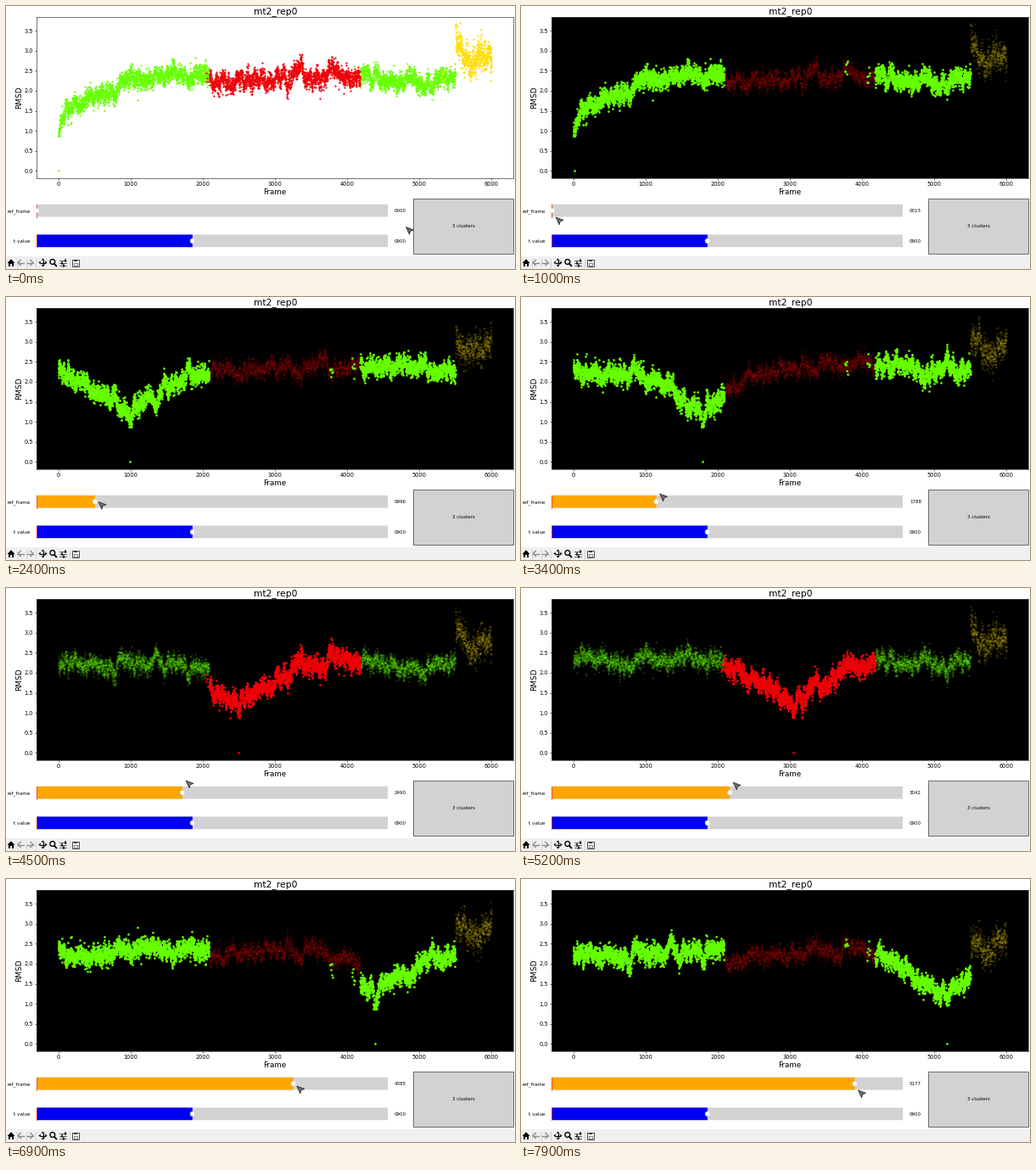
These frames come from a looping animation (600 by 310 pixels, 8 s). A matplotlib script:

```python
import numpy as np
import matplotlib.pyplot as plt
from matplotlib.animation import FuncAnimation
from matplotlib.patches import Circle, Polygon, Rectangle

W, H, DPI = 600, 310, 100
STEP, FRAMES = 100, 80
PT = 72 / DPI
N = 6000
CLICK = 800
X0, X1 = 36.2, 450

COLORS = ["#66ff00", "#ee0008", "#ffdd00"]
DIM_ALPHA = [0.25, 0.14, 0.18]
TRACK, EDGE = "#d2d2d2", "#3c3c3c"

plt.rcParams["font.family"] = "DejaVu Sans"

# --- simulated trajectory ---
rng = np.random.default_rng(4)
idx = np.arange(N)

# How far each stretch of the trajectory lies from the rest
SHIFT = [(0, 0.05), (780, -0.1), (830, 0.08), (2089, 0.06), (2090, -0.1),
         (3700, 0.12), (4300, 0.08), (5000, -0.04), (5499, 0),
         (5500, 0.85), (5700, 0.4), (6000, 0.65)]
shift = np.interp(idx, *zip(*SHIFT))


def wander(width):
    s = np.convolve(rng.normal(size=N), np.hanning(width), mode="same")
    return s / s.std()


def make_noise():
    return (0.105 * rng.normal(size=N) + 0.05 * wander(14)
            + 0.08 * wander(60) + 0.06 * wander(240))


def make_clusters():
    c = np.searchsorted([2090, 4180, 5500], idx, side="right")
    c = np.array([0, 1, 0, 2])[c]
    for centre, count, label in [(3780, 7, 0), (4090, 6, 0),
                                 (2055, 4, 1), (5330, 7, 2)]:
        c[rng.normal(centre, 12, count).astype(int)] = label
    return c


noise_a, noise_b = make_noise(), make_noise()
cluster = make_clusters()
spread = np.where(idx >= 5500, 1.6, 1.0)


def rmsd(ref):
    d = np.abs(idx - ref)
    far = 1 - np.exp(-(d / 680) ** 2)
    far = np.where(cluster == cluster[ref], far, 0.5 + 0.5 * far)
    level = 1.5 + far * (0.75 + shift + shift[ref])
    dip = 0.25 * np.exp(-d / 150) + 0.4 * np.exp(-d / 18)
    phase = ref / 450
    noise = spread * (noise_a * np.cos(phase) + noise_b * np.sin(phase))
    y = np.maximum(level - dip + noise, 0.87)
    y[ref] = 0
    return y


# --- layout in pixels, y pointing down ---
fig = plt.figure(figsize=(W / DPI, H / DPI), dpi=DPI, facecolor="white")


def pixel_axes(zorder):
    a = fig.add_axes([0, 0, 1, 1], zorder=zorder)
    a.set(xlim=(0, W), ylim=(H, 0))
    a.axis("off")
    return a


ui, top = pixel_axes(0), pixel_axes(5)


def rect(x0, y0, x1, y1, color, **kw):
    return ui.add_patch(Rectangle((x0, y0), x1 - x0, y1 - y0, fc=color, **kw))


def line(xs, ys, color="black", width=1.0):
    ui.plot(xs, ys, color=color, lw=width * PT)


def label(x, y, s, size, ha="center", va="baseline", **kw):
    return ui.text(x, y, s, fontsize=size * PT, ha=ha, va=va, **kw)


def poly(points):
    ui.add_patch(Polygon(points, fc="black"))


label(317.5, 9, "mt2_rep0", 10.7)
label(317, 222, "Frame", 8.8)
label(16, 107.5, "RMSD", 9, va="center", rotation=90)

# --- scatter plot ---
ax = fig.add_axes([X0 / W, 1 - 202.5 / H, 562 / W, 189.5 / H])
ax.set(xlim=(-300, 6305), ylim=(-0.18, 3.85),
       xticks=range(0, 6001, 1000), yticks=np.arange(0, 3.6, 0.5))
ax.tick_params(labelsize=6.6 * PT, length=2 * PT, width=0.6 * PT, pad=2 * PT)
for spine in ax.spines.values():
    spine.set(linewidth=0.7 * PT, edgecolor=EDGE)
dots = [ax.plot([], [], "o", color=c, mew=0)[0] for c in COLORS]


# --- sliders and button ---
class Bar:
    def __init__(self, y, name, color, vmax):
        self.y, self.vmax = y, vmax
        rect(X0, y, X1, y + 14.7, TRACK, snap=False)
        label(28.5, y + 9.2, name, 5.6, "right")
        self.fill = rect(X0, y, X0, y + 14.7, color, snap=False)
        line([X0, X0], [y, y + 14.7], "#e33b20", 0.8)
        self.knob = ui.add_patch(Circle((X0, y), 2.8, fc="white",
                                        ec=TRACK, lw=0.5 * PT, zorder=4))
        self.text = label(458, y + 9.2, "", 5.5, "left")

    def x(self, v):
        return X0 + (X1 - X0) * v / self.vmax

    def set(self, v):
        self.fill.set_width(self.x(v) - X0)
        self.knob.center = self.x(v), self.y + 7.4
        self.text.set_text(f"{v:04d}")


ref_bar = Bar(233.8, "ref_frame", "#ffa500", 5996)
t_bar = Bar(269.5, "t value", "#0000f2", 2028)
t_bar.set(900)

rect(480, 227, 598.4, 291.6, TRACK, ec=EDGE, lw=0.7 * PT)
label(539.5, 261.3, "3 clusters", 5.5)


# --- toolbar ---
def arrow(x, sign):
    grey = "#8c8c8c"
    line([x - 3.3, x + 3.3], [302.5, 302.5], grey, 1.4)
    line([x + sign * 0.2, x + sign * 3.3, x + sign * 0.2],
         [299.4, 302.5, 305.6], grey, 1.4)


def toolbar():
    rect(0, 295, W, H, "#f0f0f0")
    for x in (12.5, 23.5, 34.5, 74.5):
        line([x, x], [297.5, 307.5], "#c4c4c4", 0.7)

    poly([(1.5, 303), (6, 298.3), (10.5, 303)])
    poly([(3, 302), (9, 302), (9, 306.8), (6.9, 306.8), (6.9, 304.2),
          (5.1, 304.2), (5.1, 306.8), (3, 306.8)])
    arrow(17.5, -1)
    arrow(28.7, 1)

    cx, cy = 43.5, 302.5
    for dx, dy in [(1, 0), (-1, 0), (0, 1), (0, -1)]:
        bx, by = cx + 2.8 * dx, cy + 2.8 * dy
        line([cx, bx], [cy, by], width=1.2)
        poly([(cx + 5 * dx, cy + 5 * dy),
              (bx + 2 * dy, by + 2 * dx), (bx - 2 * dy, by - 2 * dx)])

    ui.add_patch(Circle((54.8, 301.5), 2.9, fc="none", ec="black",
                        lw=1.4 * PT))
    line([57, 59.3], [303.8, 306.4], width=1.8)

    for y, knob in [(299.5, 69.5), (302.5, 65.5), (305.5, 68.3)]:
        line([63.2, 71.3], [y, y], EDGE, 0.8)
        line([knob, knob], [y - 1, y + 1], width=1.5)

    rect(78, 298.5, 85.7, 306.5, "none", ec=EDGE, lw=0.9 * PT)
    rect(79.8, 298.5, 84, 301, EDGE)
    rect(79.8, 303.2, 84, 306.3, "white", ec=EDGE, lw=0.6 * PT)


toolbar()

# --- pointer and drag ---
SHAPE = np.array([(0, 0), (9, 3.4), (5.2, 4.8), (4, 8.8)])
pointer = top.add_patch(Polygon(SHAPE, fc="#6e6e6e", ec="#202020",
                                lw=0.7 * PT, joinstyle="miter"))
DRAG = [(1000, 13), (2400, 996), (3400, 1788), (4500, 2490),
        (6000, 3673), (7900, 5177)]
START = np.array([471.5, 260.5])


def pointer_at(t, ref):
    sway = 238 + 11 * np.cos(2 * np.pi * (t - 8000) / 7000)
    spot = np.array([ref_bar.x(ref) + 4, sway])
    return START + (spot - START) * min(t / CLICK, 1)


def draw(n):
    t = n * STEP
    active = t >= CLICK
    ref = int(round(np.interp(t, *zip(*DRAG)))) if active else 0
    y = rmsd(ref)
    ax.set_facecolor("black" if active else "white")
    for k, d in enumerate(dots):
        mask = cluster == k
        lit = not active or k == cluster[ref]
        d.set_data(idx[mask], y[mask])
        d.set_alpha(1 if lit else DIM_ALPHA[k])
        d.set_markersize((2.7 if active and lit else 2.2) * PT)
        d.set_zorder(3 if lit else 2)
    ref_bar.set(ref)
    pointer.set_xy(SHAPE + pointer_at(t, ref))
    return dots


anim = FuncAnimation(fig, draw, frames=FRAMES, interval=STEP, repeat=True,
                     repeat_delay=0, blit=False)
plt.show()
```
